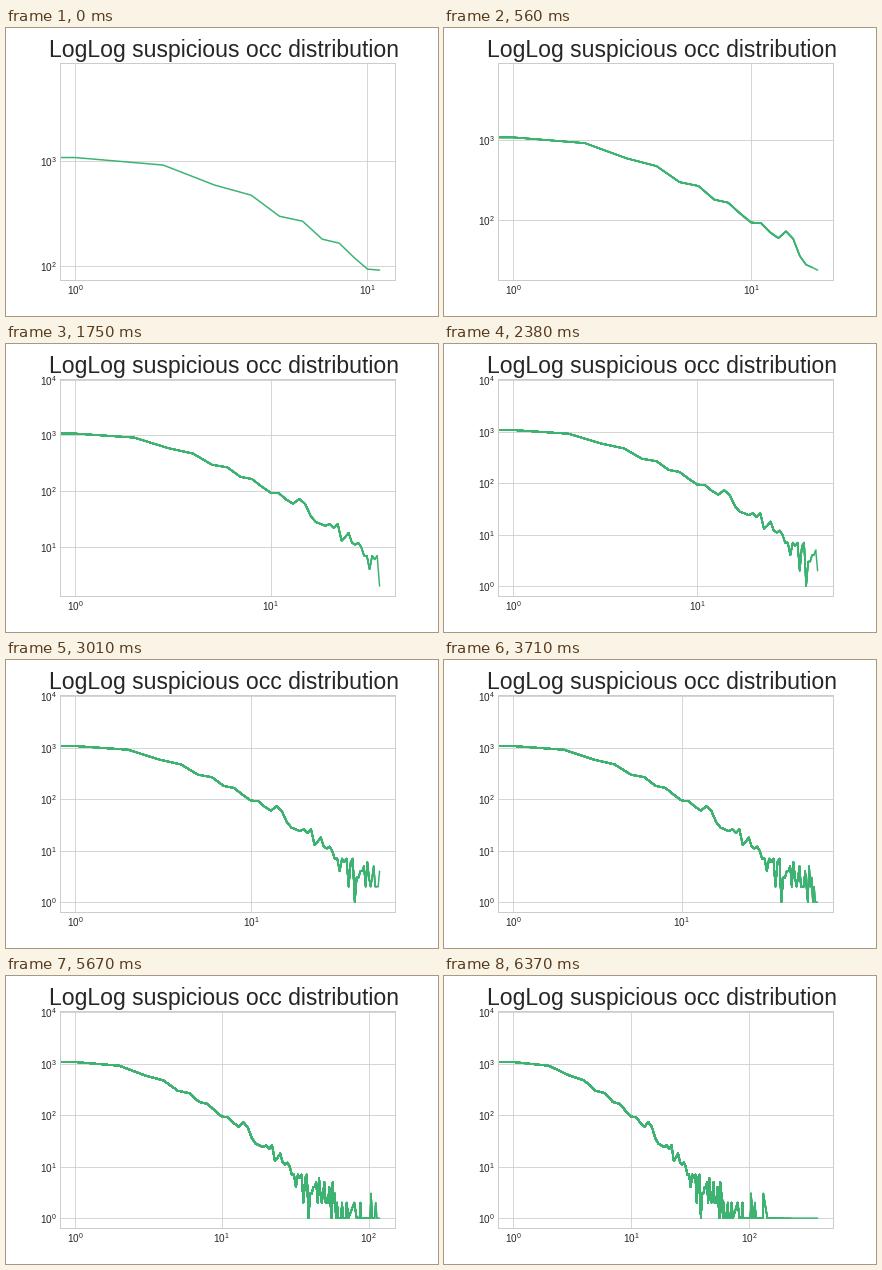
A matplotlib script that plays this animation: 432x288 px, repeating every 7140 ms.

```python
import numpy as np
import matplotlib.pyplot as plt
from matplotlib.animation import FuncAnimation
from matplotlib.ticker import NullFormatter

INTERVAL = 70
HOLD = 10          # extra frames on the finished curve
FIRST = 12         # points visible at the start
GREEN, GREY, INK = "mediumseagreen", "0.8", "0.15"

plt.rcParams.update({
    "font.family": "Liberation Sans",
    "font.size": 10,
    "text.color": INK,
    "axes.edgecolor": GREY,
    "axes.linewidth": 1,
    "axes.axisbelow": True,
    "grid.color": GREY,
    "grid.linewidth": 0.8,
    "lines.linewidth": 1.5,
    "lines.solid_capstyle": "round",
    "xtick.color": INK,
    "ytick.color": INK,
})

# Occurrence sizes: every integer first, then increasingly sparse.
sizes = np.array(list(range(72)) + [
    73, 80, 83, 84, 86, 87, 88, 89, 92, 94, 97, 99, 101, 103, 104, 106,
    108, 110, 112, 114, 119, 124, 131, 132, 143, 150, 163, 176, 195, 226, 381])

head = [6950, 1080, 916, 591, 474, 299, 268, 181, 166, 121, 94, 92,
        71, 60, 73, 59, 36, 28, 26, 24, 26, 22, 26, 13, 15, 18, 12, 11,
        12, 10, 7, 7, 4, 7, 6, 7, 2, 6, 7, 1, 3, 3, 4, 4, 5, 2,
        6, 3, 2, 3, 5, 2, 2, 2, 4, 2, 1, 5, 2, 3, 1, 2]
peaks = {66: 2, 71: 2, 80: 2, 88: 2, 104: 3, 112: 2, 132: 3}
counts = np.array(head + [peaks.get(s, 1) for s in sizes[len(head):]])

steps = len(sizes) - FIRST + 1

fig = plt.figure(figsize=(6, 4), dpi=72, facecolor="white")
ax = fig.add_axes([0.125, 0.125, 0.775, 0.755])
ax.set_xscale("log")
ax.set_yscale("log")
ax.grid(True)
ax.tick_params(which="both", length=0)
for axis in (ax.xaxis, ax.yaxis):
    axis.set_minor_formatter(NullFormatter())
ax.set_title("LogLog suspicious occ distribution", fontsize=23, x=0.49)

# Each step adds a longer curve on top of the earlier ones.
curves = [ax.plot(sizes[:FIRST + k], counts[:FIRST + k], color=GREEN)[0]
          for k in range(steps)]


def padded(low, high):
    """Limits with a 5 % margin in log space."""
    a, b = np.log10(low), np.log10(high)
    pad = 0.05 * (b - a)
    return 10 ** (a - pad), 10 ** (b + pad)


def draw(frame):
    step = min(frame, steps - 1)
    n = FIRST + step
    for k, curve in enumerate(curves):
        curve.set_visible(k <= step)
    ax.set_xlim(padded(1, sizes[n - 1]))
    ax.set_ylim(padded(counts[:n].min(), counts[:n].max()))
    return curves


anim = FuncAnimation(fig, draw, frames=steps + HOLD, interval=INTERVAL,
                     repeat=True, repeat_delay=0, blit=False)
plt.show()
```
